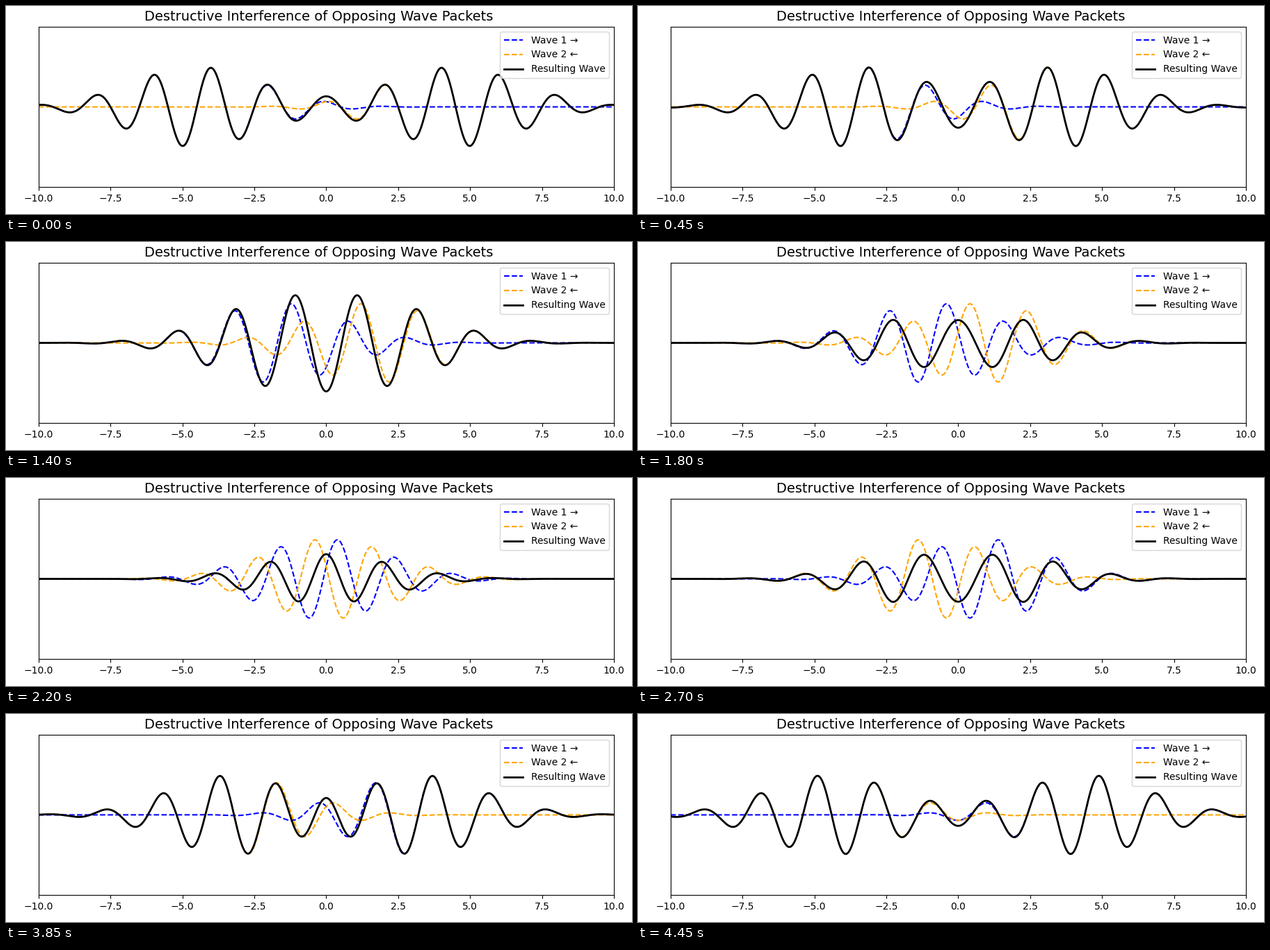
Animation, 900 px wide and 300 px high, one loop 4.5 s. Source, as a matplotlib script:

```python
import numpy as np
import matplotlib.pyplot as plt
from matplotlib.animation import FuncAnimation

FRAMES = 90
INTERVAL = 50  # ms
START = -4.5
STEP = 0.1  # packet travel per frame

plt.rcParams["font.family"] = "DejaVu Sans"

x = np.linspace(-10, 10, 1000)


def packet(u):
    """Sine wave of wavelength 2 inside a Gaussian envelope."""
    return np.exp(-0.1 * u**2) * np.sin(np.pi * u)


def waves(frame):
    center = START + STEP * frame
    right_moving = packet(x - center)
    left_moving = packet(-x - center)
    return right_moving, left_moving, right_moving + left_moving


fig, ax = plt.subplots(figsize=(9, 3), dpi=100)
fig.subplots_adjust(left=0.052, right=0.971, bottom=0.13, top=0.9)
fig.suptitle("Destructive Interference of Opposing Wave Packets", fontsize=14)

ax.set_xlim(-10, 10)
ax.set_ylim(-2, 2)
ax.set_yticks([])

first = waves(0)
lines = [
    ax.plot(x, first[0], "--", color="blue", lw=1.5, label="Wave 1 →")[0],
    ax.plot(x, first[1], "--", color="orange", lw=1.5, label="Wave 2 ←")[0],
    ax.plot(x, first[2], color="black", lw=2, label="Resulting Wave")[0],
]
ax.legend(loc="upper right")


def update(frame):
    for line, y in zip(lines, waves(frame)):
        line.set_ydata(y)
    return lines


anim = FuncAnimation(fig, update, frames=FRAMES, interval=INTERVAL,
                     repeat=True, repeat_delay=0)
plt.show()
```
